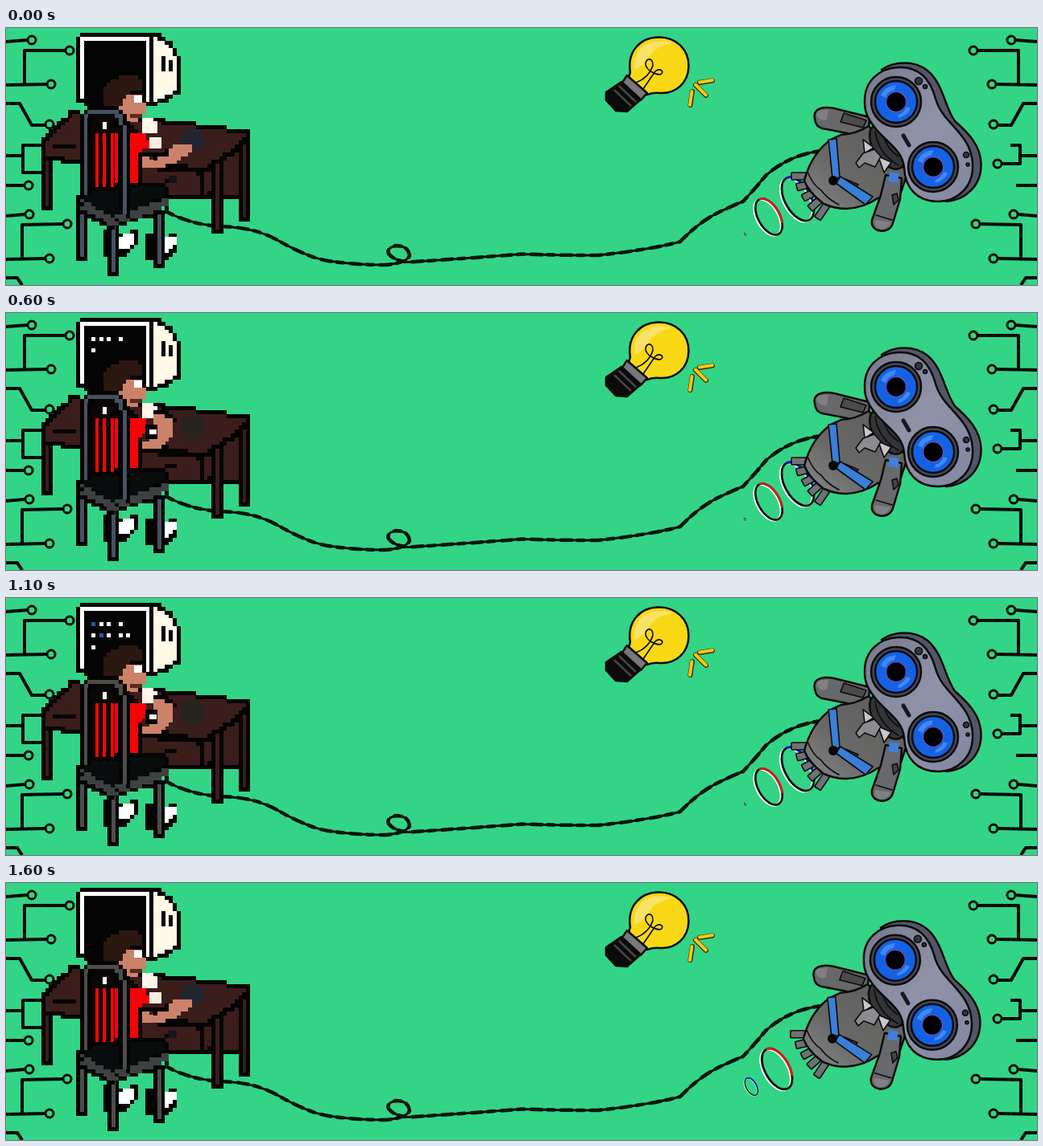
An HTML page that plays this animation: 1280x320 px, repeating every 1700 ms.

```html
<!DOCTYPE html>
<html lang="en">
<head>
<meta charset="utf-8">
<title>Coder and robot</title>
<style>
html, body { margin: 0; width: 100%; height: 100%; overflow: hidden; background: #33d485; }
svg { display: block; width: 1280px; height: 320px; }
.wire { fill: none; stroke: #050a07; stroke-width: 4; stroke-linejoin: round; }
.wire circle { stroke-width: 3; }
.ink { stroke: #0b0b0d; stroke-width: 2.5; stroke-linejoin: round; stroke-linecap: round; }
.thin { stroke-width: 1.6; }
.none { fill: none; }
.pixels { shape-rendering: crispEdges; }
</style>
</head>
<body>
<svg viewBox="0 0 1280 320">
  <defs>
    <linearGradient id="face" x1="0" y1="0" x2="1" y2="1">
      <stop offset="0" stop-color="#777a8c"/>
      <stop offset=".5" stop-color="#9093a8"/>
      <stop offset="1" stop-color="#8286a0"/>
    </linearGradient>
    <linearGradient id="metal" x1="0" y1="1" x2="1" y2="0">
      <stop offset="0" stop-color="#858589"/>
      <stop offset=".4" stop-color="#686967"/>
      <stop offset="1" stop-color="#5c5d5b"/>
    </linearGradient>
    <g id="eye">
      <circle r="31" fill="#444753" class="ink"/>
      <circle r="26" fill="#1462e4" class="ink"/>
      <path d="M-19-8Q-14-20 0-21L-2-15Q-11-13-13-5ZM18 8Q13 18 2 20L3 16Q10 13 13 6Z" fill="#3f89f6"/>
      <circle r="12.500" fill="#000" stroke="#5a4fc4" stroke-width="1.500"/>
    </g>
    <path id="cable" d="M200 229Q225 243 262 247Q305 247 335 263Q375 286 400 290Q435 295 470 295Q496 293 501 284Q500 271 484 271Q472 274 475 281Q482 290 500 291.500Q570 287 640 281.500Q690 283 735 283Q800 276 837 266Q858 244 880 232Q900 222 915 216Q930 200 943 184Q972 158 1012 153"/>
    <g id="tracks" class="wire">
      <path d="M0 17L27 15M74 28H23V70M0 71L51 70M0 94H17L32 121H49M0 234L24 232M71 244L20 245V287M0 288L49 287M0 311H14L20 320M0 159H21"/>
      <circle cx="32" cy="15" r="5"/><circle cx="79" cy="28" r="5"/>
      <circle cx="56" cy="70" r="5"/><circle cx="54" cy="120" r="5"/>
      <circle cx="29" cy="232" r="5"/><circle cx="76" cy="244" r="5"/>
      <circle cx="54" cy="287" r="5"/>
    </g>
  </defs>

  <use href="#tracks"/>
  <use href="#tracks" transform="matrix(-1 0 0 1 1280 0)"/>
  <g class="wire">
    <path d="M44 146H21V180H44M0 196H23M1247 146H1259V169H1236M1280 196H1254"/>
    <circle cx="28" cy="196" r="5"/><circle cx="1231" cy="169" r="5"/>
  </g>

  <g fill="none" stroke="#06140d" stroke-linecap="round">
    <use href="#cable" stroke-width="3"/>
    <use href="#cable" stroke-width="4.500" stroke-dasharray="8 9 13 7"/>
  </g>

  <g class="pixels" id="scene">
    <g id="desk" fill="#3b1d1b" stroke="#050404">
      <polygon points="262,166 299,142 299,212 262,212"/>
      <polygon points="46,138 56,138 56,224 46,224"/>
      <polygon points="258,168 267,168 267,252 258,252"/>
      <polygon points="291,130 300,130 300,238 291,238"/>
      <polygon points="162,168 247,178 258,172 258,206 240,210 165,210"/>
      <polygon points="48,138 82,106 175,114 300,129 300,138 268,162 246,176 170,168 86,166 48,162"/>
      <polyline points="60,146 85,146"/>
      <polyline points="170,172 245,180 245,208"/>
      <polyline points="202,190 210,190"/>
    </g>
    <g id="monitor" stroke="#050404">
      <polygon fill="#fff9e8" points="181,8 190,9 205,22 213,36 213,78 200,89 181,94"/>
      <polygon fill="#fff" points="95,8 181,8 181,94 97,94 90,89 90,14"/>
      <polygon fill="#050404" points="100,18 171,18 171,89 100,89"/>
      <polyline points="180,8 180,94"/>
      <polyline points="194,36 194,53"/>
      <polyline points="204,40 204,53"/>
    </g>
    <g id="person">
      <polygon fill="#2c1711" points="121,97 121,76 132,64 150,59 164,59 169,66 169,80 155,84 155,97 150,105 138,97"/>
      <polygon fill="#cb826a" points="149,84 158,80 173,80 173,104 164,116 150,116 139,102 145,90"/>
      <polyline stroke="#050404" points="156,82 171,82 171,92"/>
      <rect fill="#fff" x="159" y="84" width="10" height="9"/>
      <polyline stroke="#5d2a20" points="156,110 166,110"/>
      <polygon fill="#fff5e8" points="169,112 183,112 188,121 188,131 169,131"/>
      <polygon fill="#0b0707" points="101,112 135,103 152,117 168,131 168,202 97,208"/>
      <polygon fill="#f50407" points="150,132 174,132 178,147 164,154 164,199 154,199"/>
      <polyline stroke="#050404" points="151,156 151,202"/>
      <path stroke="#f50407" stroke-width="4.800" d="M113 131V199M122 131V199M132 131V199M137 131V199"/>
      <rect fill="#fff" x="120" y="117" width="5" height="9"/>
    </g>
    <g id="chair" stroke="currentColor">
      <polygon fill="#080c0c" stroke="#050404" points="92,204 160,195 197,196 200,210 160,230 132,238 92,216"/>
      <polygon id="shoe" fill="#050404" stroke="none" points="122,251 137,251 144,256 162,251 162,270 148,286 122,286"/>
      <polygon fill="#fff" stroke="none" points="138,263 146,258 160,254 160,265 149,276 138,276"/>
      <polygon fill="#050404" stroke="none" points="174,255 189,255 196,260 214,255 214,274 200,290 174,290"/>
      <polygon fill="#fff" stroke="none" points="190,267 198,262 212,258 212,269 201,280 190,280"/>
      <path stroke="#050404" stroke-width="14" d="M94 222V290M133 242V309M190 232V299"/>
      <path stroke-width="5" d="M94 222V285M133 242V304M190 232V294"/>
      <polyline stroke="#050404" points="90,210 90,226 112,239 132,247 154,239 198,226"/>
      <polyline stroke="#3e4141" points="95,217 132,238 154,231 198,216"/>
      <polyline stroke="#3e4141" points="95,222 132,243 154,236 198,221"/>
      <polyline stroke="#050404" points="102,101 92,111 92,208"/>
      <polyline stroke="#050404" points="105,98 135,98 146,110 152,132 152,232"/>
      <polyline points="97,206 97,112 106,103 134,103 143,113 147,133 147,229"/>
      <polyline stroke="#050404" points="102,206 102,120 110,109"/>
      <polyline stroke="#050404" points="133,112 141,124 141,226"/>
    </g>
  </g>
  <g class="pixels" id="code"></g>
  <g class="pixels" id="reach">
    <polygon fill="#22252e" points="222,127 240,125 245,134 243,151 225,154 217,142"/>
    <polygon fill="#cb826a" points="168,158 183,163 197,159 207,147 216,142 232,147 232,155 218,161 205,170 183,176 168,172"/>
    <polyline stroke="#050404" points="166,157 185,160 200,154"/>
    <polygon fill="#f4eee4" points="178,136 192,136 192,151 180,151"/>
    <rect fill="#14141c" x="202" y="184" width="10" height="9"/>
  </g>
  <g class="pixels" id="type">
    <polygon fill="#29231e" points="220,127 238,124 245,134 243,153 228,160 216,149"/>
    <polygon fill="#cb826a" points="183,126 200,126 208,133 208,149 198,163 186,171 168,169 168,160 183,155"/>
    <polyline stroke="#050404" points="183,124 200,124 208,132"/>
    <polyline stroke="#050404" points="168,173 188,173 199,166"/>
    <rect fill="#050404" x="173" y="139" width="15" height="18"/>
    <rect fill="#fff" x="178" y="145" width="9" height="6"/>
  </g>

  <g id="bulb">
    <path d="M775 55C771 29 787 12 810 11.500C832 11 848 27 847.500 48C847 68 832 82 812 81Q804 80 796 83L773 62Z" fill="#f8d814" class="ink"/>
    <path d="M780 48Q780 23 804 17Q818 15 827 19Q806 23 798 36Q791 48 781 52Z" fill="#f8e268"/>
    <path d="M782 68Q798 62 803 47C804 36 794 37 794 45C795 53 806 58 812 58C819 55 812 49 806 54L791 76" class="ink thin none"/>
    <path d="M771 59L796 81L788 90L765 68Z" fill="#78777a" class="ink"/>
    <path d="M764 67L788 89L771 104L757 103L745 90V80Z" fill="#0b0b0b" class="ink"/>
    <path d="M761 72L782 92M755 77L776 97" stroke="#494545" stroke-width="2.500"/>
    <path id="rays" d="M861 68L877 65.500M856 71L869 84M852 79L849.500 96" stroke="#332c08" stroke-width="6" stroke-linecap="round"/>
    <path d="M861 67.500L877 65M856 70.500L869 83.500M851.500 79L849 96" stroke="#f8c912" stroke-width="4" stroke-linecap="round"/>
  </g>

  <g id="robot">
    <g id="rings" fill="none"></g>
    <g id="feet" fill="#707075" class="ink thin"></g>
    <g class="ink">
      <path d="M1004 113C1001 101 1013 97 1028 100L1072 111L1070 139L1044 131L1013 125Q1005 123 1004 113Z" fill="#67686a"/>
      <path d="M1040 106L1068 115L1064 124L1036 117Z" fill="#4b4b4b" class="thin"/>
      <path d="M1037 133Q1055 132 1071 122L1119 180L1111 205L1082 212Q1065 224 1043 225Q1026 225 1014 218Q996 204 991 190Q1000 156 1024 139Z" fill="url(#metal)"/>
      <path d="M1092 183L1112 187L1110 213L1101 243C1097 258 1072 255 1075 239L1086 208Z" fill="#68696c"/>
      <path d="M1100 208L1106 206L1108 214L1102 220Z" fill="#454545" class="thin"/>
      <path d="M1080 233L1100 239" class="none thin"/>
    </g>
    <path d="M1006 106Q1010 101 1021 102L1019 114Q1008 117 1006 106ZM1079 239L1098 242Q1094 252 1084 250Q1077 247 1079 239Z" fill="#929297" opacity=".6"/>
    <ellipse cx="1094" cy="148" rx="17" ry="31" transform="rotate(-32 1094 148)" fill="#343436" class="ink"/>
    <path d="M1079 129Q1083 157 1108 171M1089 133Q1093 150 1108 160" class="ink thin none"/>
    <g class="ink thin">
      <path d="M1064 139L1077 149L1066 156ZM1083 160L1099 167L1090 180Z" fill="#c7c7c9"/>
      <path d="M1064 156L1078 151L1086 160L1079 173L1066 168L1059 174L1055 168Z" fill="#8b8b90"/>
      <path d="M1042 188L1058 195L1049 204L1038 199Z" fill="#444"/>
      <path d="M1021 139L1031 138L1035 186L1026 188ZM1030 193L1036 185L1076 210L1067 220Z" fill="#397ed7"/>
      <path d="M995 179Q1002 196 1012 202Q1020 213 1034 220" class="none"/>
    </g>
    <circle cx="1027" cy="190" r="6" fill="#080809"/>
    <rect x="1096" y="180" width="12" height="12" fill="#3f7fdc" transform="rotate(8 1102 186)"/>
    <path d="M1087 52C1102 41 1128 40 1144 53C1164 70 1165 98 1178 116C1194 130 1210 146 1210.500 169C1211 196 1192 214 1167 216L1130 197L1100 70Z" fill="#535666" class="ink"/>
    <path d="M1066 93C1065 67 1083 50 1108 49C1132 48 1147 62 1154 88C1162 119 1199 131 1200 170C1201 198 1181 216 1157 216C1131 216 1116 199 1115 174C1113 153 1096 144 1081 127C1071 115 1066 106 1066 93Z" fill="url(#face)" class="ink"/>
    <use href="#eye" x="1105" y="92"/>
    <use href="#eye" x="1151" y="173"/>
    <path d="M1114 134L1121 146" stroke="#17171d" stroke-width="5" stroke-linecap="round"/>
    <g fill="#33343e" class="ink thin">
      <circle cx="1133" cy="66" r="4.500"/><circle cx="1141" cy="73" r="2.500"/>
      <circle cx="1192" cy="158" r="3.500"/><circle cx="1194" cy="170" r="2"/>
    </g>
  </g>
</svg>

<script>
const $ = id => document.getElementById(id);
const show = (el, on) => { el.style.display = on ? '' : 'none'; };
const clamp = (v, lo, hi) => Math.min(hi, Math.max(lo, v));
function make(tag, attrs, parent) {
  const el = document.createElementNS('http://www.w3.org/2000/svg', tag);
  for (const k in attrs) el.setAttribute(k, attrs[k]);
  if (parent) parent.append(el);
  return el;
}

// Pixel art: snap polygons and polylines to a coarse grid.
const CELL = 4.8, LEFT = 0.6, TOP = 1.2;
const cellPath = set => [...set].map(k => {
  const [c, r] = k.split(',');
  return `M${(LEFT + c * CELL).toFixed(1)} ${(TOP + r * CELL).toFixed(1)}h5v5h-5z`;
}).join('');

function fillCells(pts) {
  const set = new Set();
  for (let r = 0; r < 66; r++) for (let c = 0; c < 66; c++) {
    const x = LEFT + (c + .5) * CELL, y = TOP + (r + .5) * CELL;
    let hit = false;
    pts.forEach((a, i) => {
      const b = pts[(i + 1) % pts.length];
      if (a.y > y !== b.y > y && x < (b.x - a.x) * (y - a.y) / (b.y - a.y) + a.x) hit = !hit;
    });
    if (hit) set.add(c + ',' + r);
  }
  return set;
}
function edgeCells(pts) {
  const set = new Set();
  pts.slice(1).forEach((b, i) => {
    const a = pts[i], n = Math.ceil(Math.hypot(b.x - a.x, b.y - a.y) / 3);
    for (let j = 0; j <= n; j++) {
      const x = a.x + (b.x - a.x) * j / n, y = a.y + (b.y - a.y) * j / n;
      set.add(Math.floor((x - LEFT) / CELL) + ',' + Math.floor((y - TOP) / CELL));
    }
  });
  return set;
}
document.querySelectorAll('.pixels polygon, .pixels polyline').forEach(el => {
  const pts = [...el.points], { fill, stroke } = getComputedStyle(el);
  const closed = el.tagName === 'polygon';
  const inherits = !el.hasAttribute('stroke') && el.closest('#chair');
  const parts = [];
  if (closed) parts.push(make('path', { d: cellPath(fillCells(pts)), fill, stroke: 'none' }));
  if (stroke !== 'none') parts.push(make('path', {
    d: cellPath(edgeCells(closed ? [...pts, pts[0]] : pts)),
    fill: inherits ? 'currentColor' : stroke, stroke: 'none'
  }));
  el.replaceWith(...parts);
});

// Typed characters: three rows, with a gap after the third column.
const glyphs = [4, 5, 1].flatMap((len, row) => Array.from({ length: len }, (_, col) =>
  make('rect', { x: 106 + col * 9.6 + (col > 2 ? CELL : 0), y: 30 + row * 14.4, width: 5, height: 5 }, $('code'))));

function drawCode(n) {
  glyphs.forEach((el, i) => {
    show(el, i < n);
    el.setAttribute('fill', i % 5 === 0 && n >= 6 + i * .8 ? '#1a5fb4' : '#fff');
  });
}

// Fanned thruster fins.
for (let i = 0; i < 5; i++)
  make('rect', { x: -3, y: -5, width: 21, height: 9, rx: 1,
    transform: `translate(${993 + 6 * i} ${184 + 9.5 * i}) rotate(${180 - 14 * i})` }, $('feet'));

// Exhaust rings leave every half cycle, alternating in colour, and shrink with age.
const rings = [0, 1, 2].map(() => {
  const g = make('g', {}, $('rings'));
  return { g, halo: make('ellipse', { stroke: '#fff' }, g), rim: make('ellipse', { stroke: '#08110d' }, g),
    tint: make('path', {}, g) };
});
function drawRing({ g, halo, rim, tint }, u, color) {
  const rx = 16 * (1 - (u / 2.05) ** 2.5), ry = rx * 1.85, w = clamp(rx / 5, .8, 2.8);
  g.setAttribute('transform', `translate(${983 - 39 * u + 3 * u * u} ${213 + 22 * u}) rotate(-29)`);
  g.setAttribute('stroke-width', w);
  for (const el of [halo, rim]) {
    el.setAttribute('rx', rx);
    el.setAttribute('ry', ry);
  }
  halo.setAttribute('cx', -w * .7);
  tint.setAttribute('d', `M0 ${-ry}A${rx} ${ry} 0 0 1 ${rx * .8} ${ry * .6}`);
  tint.setAttribute('stroke', color);
}

const LOOP = 1700, STEP = 100, HOVER = 550, POSES = 6;
let last = -1;

function draw(step) {
  const pose = Math.floor(step * STEP % HOVER / HOVER * POSES);
  const angle = -.23 - pose * 2 * Math.PI / POSES;
  $('robot').setAttribute('transform', `translate(${-3.8 + 4 * Math.cos(angle)} ${.9 + 4 * Math.sin(angle)})`);
  rings.forEach((ring, i) => {
    const age = pose % 3 + 3 * i;
    show(ring.g, age <= POSES);
    if (age <= POSES) drawRing(ring, age / 3, (pose - age) % POSES === 0 ? '#1016d8' : '#e01818');
  });

  const reaching = step < 2 || step > 12;
  show($('reach'), reaching);
  show($('type'), !reaching);
  $('scene').style.color = step % 6 || step > 6 ? '#4c4c4c' : '#465060';
  drawCode(step > 14 ? 0 : clamp(Math.round(1.2 * step - 2.5), 0, glyphs.length));
}
function tick() {
  const step = Math.floor(performance.now() % LOOP / STEP);
  if (step !== last) draw(last = step);
  requestAnimationFrame(tick);
}
tick();
</script>
</body>
</html>
```
